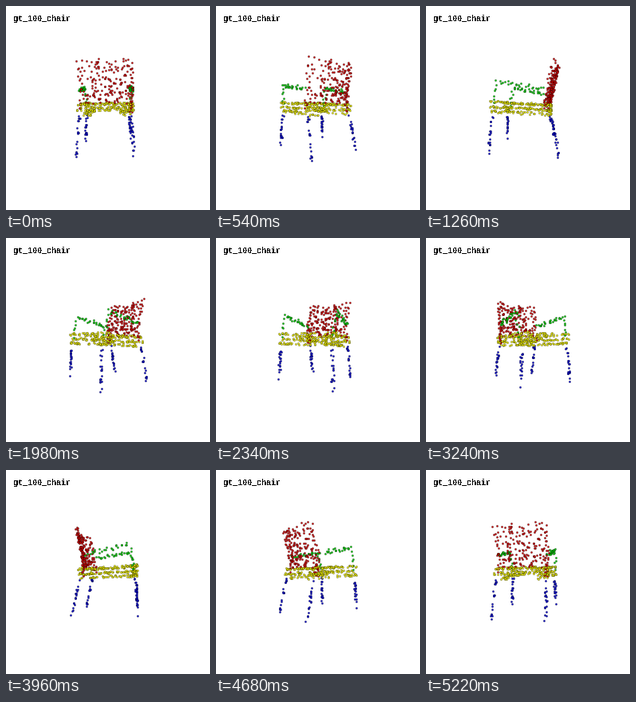
Animation of 256 by 256 pixels, one loop 5400 ms. Source, as a matplotlib script:

```python
import numpy as np
import matplotlib.pyplot as plt
from matplotlib.animation import FuncAnimation

SIZE, DPI = 256, 100
FRAMES, INTERVAL = 30, 180
PT = 72 / DPI                  # points per pixel
CENTER, CAMERA = 128, 200
YAW = -3                       # starting angle in degrees

RED, YELLOW = "#e00000", "#ffff00"
GREEN, BLUE = "#00dc00", "#0000e0"

rng = np.random.default_rng(100)


def uni(lo, hi, n):
    return rng.uniform(lo, hi, n)


def edgy(lo, hi, n):
    """Random values that gather towards both ends."""
    return (lo + hi) / 2 + (hi - lo) / 2 * np.sin(uni(-np.pi / 2, np.pi / 2, n))


def cloud(x, y, z):
    """Points of the chair, which is a little wider at the front."""
    return np.column_stack(np.broadcast_arrays(x * (1 - 0.0016 * z) - 1.5, y, z))


def backrest(n):
    """Curved panel that leans away from the seat."""
    u, y = uni(-1, 1, n), uni(-51, -4, n)
    return cloud(32 * u, y, 26 - 0.23 * y - 7 * u**2 + uni(-1.8, 1.8, n))


def posts(n):
    side = rng.choice([-1, 1], n)
    y = uni(-8, 6, n)
    return cloud(side * uni(28, 31, n), y, 23 + uni(-2, 3, n))


def seat_layer(n, drop, x):
    z = edgy(-36, 29, n)
    return cloud(x, -7 + drop + 0.06 * (z + 34) + uni(-1.2, 1.2, n), z)


def rails(n):
    return rng.choice([-1, 1], n) * uni(17, 32, n)


def arm(side, n):
    """Rest that drops slightly backwards and bends down to the seat in front."""
    t = np.linspace(0, 1, n)
    bend = np.clip((t - 0.8) / 0.2, 0, 1)
    level = np.minimum(t / 0.8, 1)
    y = -20 - 9 * level + 25 * bend + uni(-2.2, 2.2, n)
    z = 20 - 47 * level - 6 * bend + uni(-2, 2, n)
    return cloud(side * 31 + uni(-2.5, 2.5, n), y, z)


def leg(side, top_z, foot_z, foot_y, n=19):
    t = np.sort(uni(0, 1, n))
    t[-1] = 1
    x = side * (29.5 + 2 * t) + uni(-1.4, 1.4, n)
    return cloud(x, 9 + (foot_y - 9) * t, top_z + (foot_z - top_z) * t + uni(-1, 1, n))


parts = [
    (RED, backrest(190)),
    (RED, posts(16)),
    (YELLOW, seat_layer(110, 0, edgy(-32, 32, 110))),
    (YELLOW, seat_layer(95, 6, edgy(-32, 32, 95))),
    (YELLOW, seat_layer(65, 11, rails(65))),
    (GREEN, arm(-1, 30)),
    (GREEN, arm(1, 30)),
    (BLUE, leg(-1, -34.5, -37, 49)),
    (BLUE, leg(1, -34.5, -36, 45.5)),
    (BLUE, leg(-1, 28, 37, 51)),
    (BLUE, leg(1, 28, 37, 48.5)),
]
points = np.vstack([p for _, p in parts])
colors = np.repeat([c for c, _ in parts], [len(p) for _, p in parts])

fig = plt.figure(figsize=(SIZE / DPI, SIZE / DPI), dpi=DPI, facecolor="white")
ax = fig.add_axes([0, 0, 1, 1])
ax.set(xlim=(0, SIZE), ylim=(SIZE, 0))
ax.axis("off")
ax.text(9.5, 19, "gt_100_chair", family="Liberation Mono", weight="bold",
        size=10 * PT, va="baseline", color="black", antialiased=False)
dots = ax.scatter([], [], s=(2.2 * PT) ** 2, edgecolors="black", linewidths=0.3 * PT)


def project(angle):
    x, y, z = points.T
    c, s = np.cos(angle), np.sin(angle)
    depth = z * c - x * s
    scale = CAMERA / (CAMERA - depth)
    xy = CENTER + np.column_stack([x * c + z * s, y]) * scale[:, None]
    return np.floor(xy) + 0.5, depth


def update(i):
    xy, depth = project(np.radians(YAW + 360 * i / FRAMES))
    order = np.argsort(depth)
    dots.set_offsets(xy[order])
    dots.set_facecolors(colors[order])
    return [dots]


anim = FuncAnimation(fig, update, frames=FRAMES, interval=INTERVAL,
                     repeat=True, repeat_delay=0)
plt.show()
```
